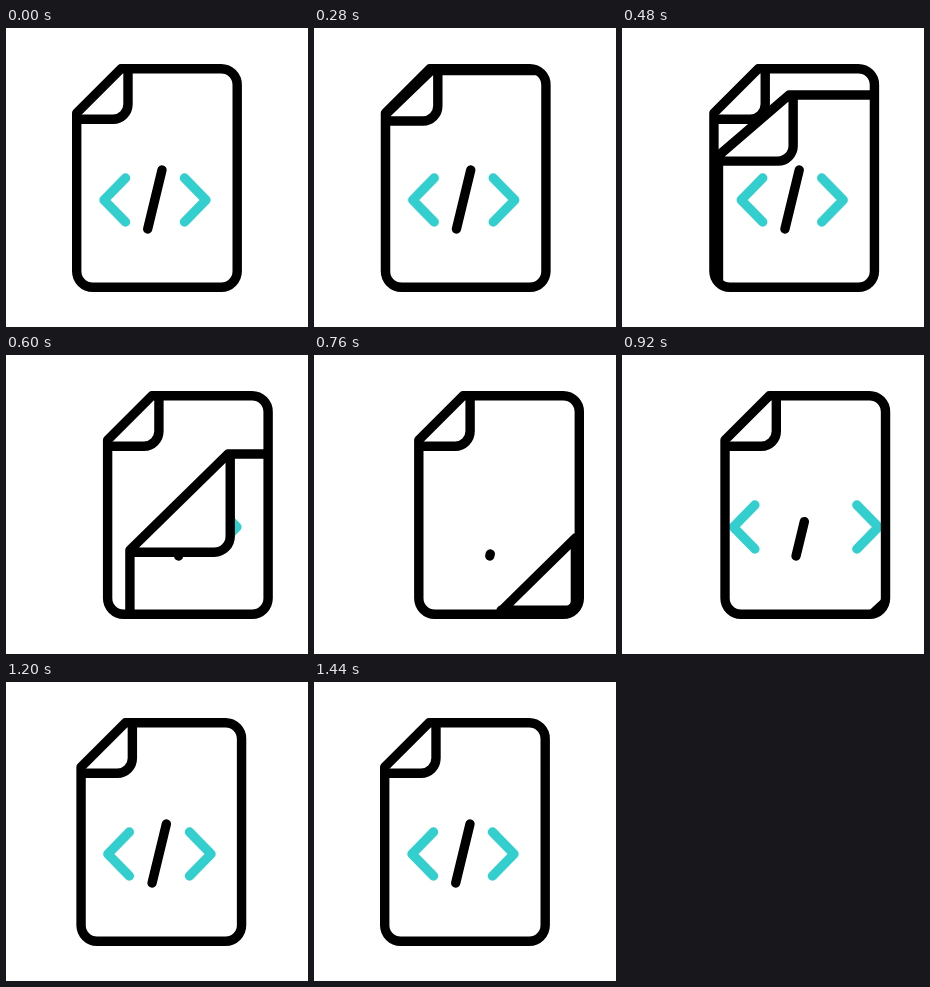
An HTML page with a canvas for the animation above (2000 ms loop, 302x299 px).

```html
<!DOCTYPE html>
<html lang="en">
<head>
<meta charset="utf-8">
<title>Code file</title>
<style>
  html, body { margin: 0; width: 100%; height: 100%; overflow: hidden; background: #fff; }
  canvas { display: block; width: 302px; height: 299px; }
</style>
</head>
<body>
<canvas id="stage"></canvas>
<script>
const W = 302, H = 299, LOOP = 2000, STEP = 40;
const INK = '#000', TEAL = '#33cfcf', STROKE = 9.4;
const PAGE = { l: 70.7, r: 231.2, t: 40.7, b: 259.3 };

const canvas = document.getElementById('stage');
const ctx = canvas.getContext('2d');
const dpr = window.devicePixelRatio || 1;
canvas.width = Math.round(W * dpr);
canvas.height = Math.round(H * dpr);

// Peeling corner: time, A (left end), B (top end), C (curl corner), radius
const PEEL = [
  [220, 70.7, 85, 115, 40.7, 122, 91.2, 15],
  [400, 70.7, 98, 125, 54, 130.3, 104.7, 15],
  [600, 93, 195, 191, 99, 193.3, 197.2, 16],
  [760, 153, 256, 227.3, 183, 227.3, 255.3, 9],
  [920, 218, 259, 231, 247, 231, 259, 2],
  [1000, 245, 270, 241, 268, 246, 270, 1]
];

const clamp = v => Math.min(1, Math.max(0, v));
const span = (t, a, b) => clamp((t - a) / (b - a));
const smooth = p => p * p * (3 - 2 * p);

// cubic-bezier(.55, 0, .23, 1)
function ease(x) {
  let lo = 0, hi = 1;
  for (let i = 0; i < 24; i++) {
    const s = (lo + hi) / 2, q = 1 - s;
    if (3 * s * q * q * 0.55 + 3 * s * s * q * 0.23 + s * s * s < x) lo = s;
    else hi = s;
  }
  return smooth(lo);
}

// Monotone cubic through the peel poses
function peelAt(t) {
  let i = 0;
  while (i < PEEL.length - 2 && t > PEEL[i + 1][0]) i++;
  const gap = PEEL[i + 1][0] - PEEL[i][0];
  const p = clamp((t - PEEL[i][0]) / gap), q = 1 - p;
  const slope = (j, k) => (PEEL[j + 1][k] - PEEL[j][k]) / (PEEL[j + 1][0] - PEEL[j][0]);
  const tangent = (j, k) => {
    if (j === 0) return 0;
    if (j === PEEL.length - 1) return slope(j - 1, k);
    const a = slope(j - 1, k), b = slope(j, k);
    return a * b > 0 ? 2 * a * b / (a + b) : 0;
  };
  return PEEL[i].slice(1).map((v, n) => {
    const k = n + 1;
    return v * (1 + 2 * p) * q * q + PEEL[i + 1][k] * p * p * (3 - 2 * p)
      + gap * (tangent(i, k) * p * q * q - tangent(i + 1, k) * p * p * q);
  });
}

function pagePath() {
  const { l, r, t, b } = PAGE, c = 16;
  const path = new Path2D();
  path.moveTo(l, 85);
  path.lineTo(115, t);
  path.arcTo(r, t, r, b, c);
  path.arcTo(r, b, l, b, c);
  path.arcTo(l, b, l, t, c);
  path.closePath();
  return path;
}

// The two inner edges of a turned corner
function foldPath([ax, , , by, cx, cy, r]) {
  const path = new Path2D();
  path.moveTo(cx, by);
  path.arcTo(cx, cy, ax, cy, r);
  path.lineTo(ax, cy);
  return path;
}

function curlPath(pose) {
  const [ax, ay, bx, by] = pose;
  const path = foldPath(pose);
  path.lineTo(ax, ay);
  path.lineTo(bx, by);
  path.closePath();
  return path;
}

function sheetPath([ax, ay, bx, by]) {
  const path = new Path2D();
  path.moveTo(ax, ay);
  path.lineTo(bx, by);
  path.lineTo(280, by);
  path.lineTo(280, 290);
  path.lineTo(ax, 290);
  path.closePath();
  return path;
}

function line(color, ...pts) {
  ctx.strokeStyle = color;
  ctx.lineWidth = STROKE;
  ctx.beginPath();
  pts.forEach(([x, y]) => ctx.lineTo(x, y));
  ctx.stroke();
}

function outline(path) {
  ctx.strokeStyle = INK;
  ctx.lineWidth = STROKE;
  ctx.stroke(path);
}

function fillWhite(path) {
  ctx.fillStyle = '#fff';
  ctx.fill(path);
}

function code(left, right, grow) {
  const chevron = (x, tip) => line(TEAL, [x, 150], [tip, 172], [x, 194]);
  chevron(119.5 + left, 98 + left);
  chevron(178.5 + right, 200 + right);
  if (grow > 0) line(INK, [141.7, 201], [141.7 + 14.3 * grow, 201 - 59 * grow]);
}

const page = pagePath();
const fold = foldPath(PEEL[0].slice(1));

function draw(t) {
  ctx.setTransform(dpr, 0, 0, dpr, 0, 0);
  ctx.fillStyle = '#fff';
  ctx.fillRect(0, 0, W, H);
  ctx.lineCap = ctx.lineJoin = 'round';

  const shift = 34.2 * (t < 800 ? ease(span(t, 205, 800)) : 1 - ease(span(t, 800, 1440)));
  ctx.translate(shift, 0);

  ctx.save();
  ctx.clip(page);
  if (t <= 220) {
    code(0, 0, 1);
  } else if (t > 720) {
    const away = Math.pow(1 - span(t, 760, 1320), 3);
    code(-52 * away, 66 * away, smooth(span(t, 720, 1080)));
  }
  outline(fold);

  if (t > 220 && t < 1000) {
    const pose = peelAt(t);
    const sheet = sheetPath(pose), curl = curlPath(pose);
    fillWhite(sheet);
    ctx.save();
    ctx.clip(sheet);
    code(0, 0, 1);
    ctx.restore();
    fillWhite(curl);
    sheet.addPath(curl);
    outline(sheet);
  }
  ctx.restore();
  outline(page);
}

const start = performance.now();
function frame() {
  const t = (performance.now() - start) % LOOP;
  draw(Math.floor(t / STEP) * STEP);
  requestAnimationFrame(frame);
}
frame();
</script>
</body>
</html>
```
